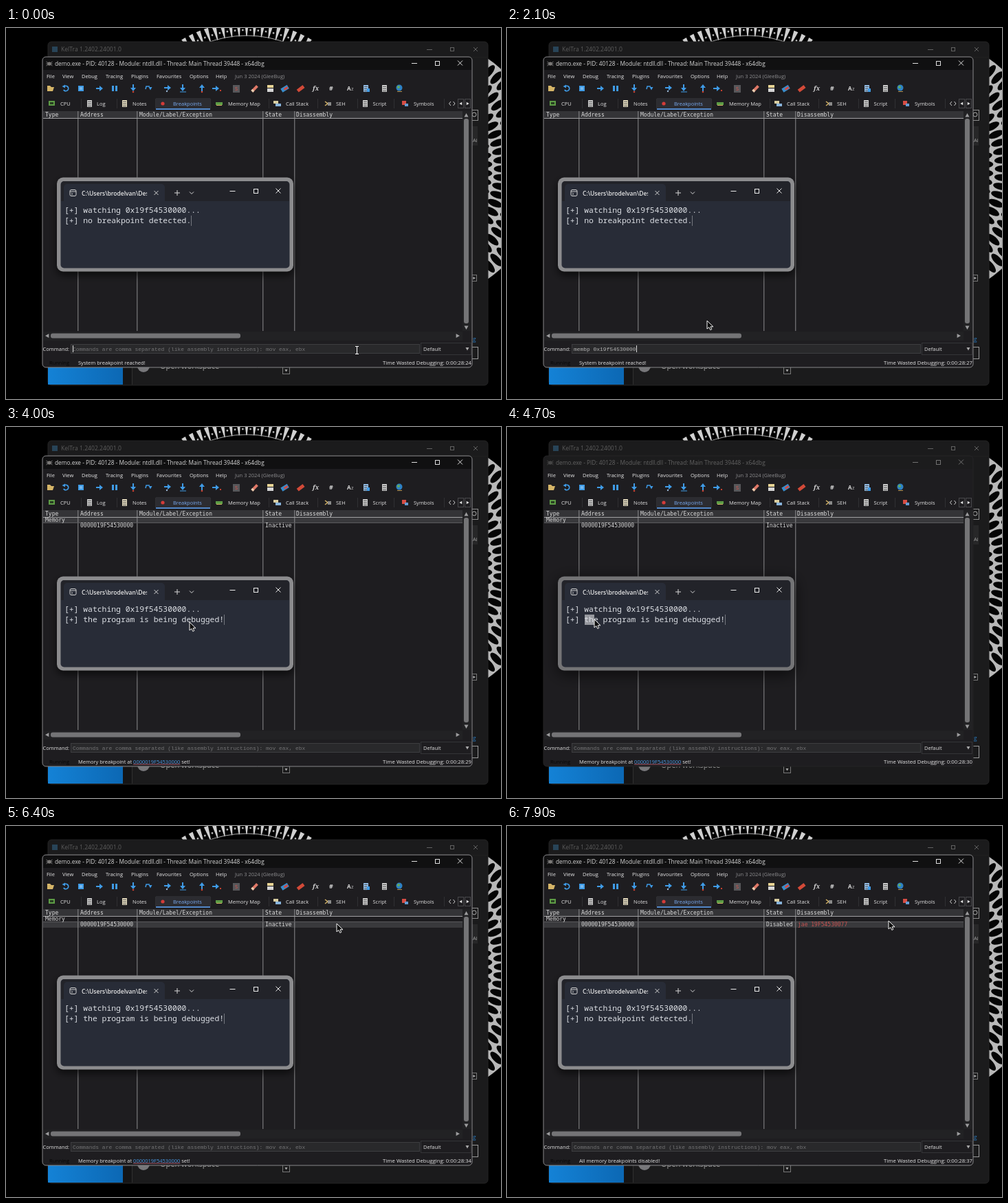
Animation of 720x540 px, one loop 8000 ms. Source, as an HTML page with a canvas:

```html
<!DOCTYPE html>
<html>
<head>
<meta charset="utf-8">
<title>Breakpoint demo</title>
<style>
html, body { margin: 0; width: 100%; height: 100%; overflow: hidden; background: #000; }
canvas { display: block; width: 720px; height: 540px; }
</style>
</head>
<body>
<canvas id="stage" width="720" height="540"></canvas>
<script>
const g = document.getElementById('stage').getContext('2d');
const LOOP = 8000, STEP = 100, TAU = Math.PI * 2;
const UI = '7.5px "Open Sans", sans-serif';
const UI_BIG = '8.3px "Open Sans", sans-serif';
const TABLE = '8px "DejaVu Sans Mono", monospace';
const INPUT = '7.95px "Liberation Mono", monospace';
const TERM = '11.38px "Noto Sans Mono", monospace';
const BLUE = '#3f9be6', RED = '#c8402f', GREEN = '#5d9c45', SAND = '#d5b568';

// ---------- drawing helpers ----------
function rect(x, y, w, h, color) { g.fillStyle = color; g.fillRect(x, y, w, h); }
function box(x, y, w, h, color) {
  g.strokeStyle = color; g.lineWidth = 1; g.strokeRect(x + .5, y + .5, w - 1, h - 1);
}
function round(x, y, w, h, r, fill, stroke) {
  g.beginPath(); g.roundRect(x, y, w, h, r);
  if (fill) { g.fillStyle = fill; g.fill(); }
  if (stroke) { g.strokeStyle = stroke; g.lineWidth = 1; g.stroke(); }
}
function path(points, color, width = 1) {
  g.beginPath();
  points.forEach(([x, y]) => g.lineTo(x, y));
  g.strokeStyle = color; g.lineWidth = width; g.stroke();
}
function poly(points, color) {
  g.beginPath();
  points.forEach(([x, y]) => g.lineTo(x, y));
  g.fillStyle = color; g.fill();
}
function disc(x, y, r, color) {
  g.beginPath(); g.arc(x, y, r, 0, TAU); g.fillStyle = color; g.fill();
}
function text(str, x, y, font, color, align = 'left') {
  g.font = font; g.fillStyle = color; g.textAlign = align;
  g.fillText(str, x, y);
  return x + g.measureText(str).width;
}
function at(x, y, angle, draw) {
  g.save(); g.translate(x, y); g.rotate(angle); draw(); g.restore();
}
function triangle(x, y, angle, color, s = 3) {
  at(x, y, angle, () => poly([[-s * .8, -s], [s, 0], [-s * .8, s]], color));
}
function windowButtons(xs, y, color, s = 3.5) {
  const [min, max, close] = xs;
  path([[min - 4, y + .5], [min + 4, y + .5]], color);
  box(Math.round(max - s), Math.round(y - s), s * 2, s * 2, color);
  cross(close, y, s, color);
}
function cross(x, y, s, color) {
  path([[x - s, y - s], [x + s, y + s]], color);
  path([[x + s, y - s], [x - s, y + s]], color);
}

// ---------- wallpaper ----------
function wallpaper() {
  rect(0, 0, 720, 540, '#000');
  for (let i = 0; i < 96; i++) {
    at(350, 175, i * TAU / 96, () => {
      poly([[163, -.6], [184, -3.2], [184, 3.2], [163, .6]], '#cfcfcf');
      disc(172, 5.6, 1.4, '#b5b5b5');
    });
  }
  g.beginPath(); g.arc(350, 175, 164, 0, TAU);
  g.strokeStyle = '#aaa'; g.lineWidth = 1; g.stroke();

  g.save();
  g.beginPath(); g.rect(698, 30, 22, 350); g.clip();
  disc(590, 205, 195, '#b8b8b8');
  for (let ring = 0; ring < 5; ring++) {
    const r = 181 - ring * 25, n = 84 - ring * 10;
    for (let i = 0; i < n; i++) {
      at(590, 205, (i + ring % 2 / 2) * TAU / n, () => {
        g.beginPath(); g.ellipse(r, 0, 11.5, 5, 0, 0, TAU);
        g.fillStyle = '#050505'; g.fill();
      });
    }
  }
  g.restore();
}

// ---------- window behind ----------
function backWindow() {
  round(61, 20, 640, 500, 5, '#1b1b1c', '#242424');
  rect(61, 42, 640, 1, '#202020');
  rect(67, 27, 8, 8, '#284458');
  text('KelTra 1.2402.24001.0', 80, 34, '8.6px "Open Sans", sans-serif', '#5c5c5c');
  windowButtons([616, 649, 683], 31, '#626262', 3);
  const blue = g.createLinearGradient(61, 0, 170, 0);
  blue.addColorStop(0, '#1482d6'); blue.addColorStop(1, '#0c68b4');
  rect(61, 488, 109, 31, blue);
  rect(170, 488, 13, 31, '#151516');
  rect(183, 488, 1, 31, '#303030');
  disc(200, 492, 9, '#77777a');
  text('Open workspace', 224, 496, '11px "Open Sans", sans-serif', '#a5a5a5');
  box(402, 493, 11, 11, '#777');
  triangle(407.5, 498.5, Math.PI / 2, '#aaa', 2);
  box(672, 119, 15, 16, '#8d8d8d');
  g.beginPath(); g.arc(681, 126, 3, 0, TAU); g.strokeStyle = '#aaa'; g.stroke();
  rect(678, 143, 8, 28, '#272728');
  text('Ai', 679, 166, UI, '#a0a0a0');
  box(674, 359, 11, 10, '#777');
  triangle(681, 364, 0, '#aaa', 2);
  text('g', 679, 456, UI_BIG, '#2a79bd');
  box(670, 464, 17, 18, '#999');
}

// ---------- toolbar ----------
function arrow(x, y, angle, color = BLUE) {
  at(x, y, angle, () => {
    rect(-5, -1, 6, 2, color);
    poly([[0, -4], [5, 0], [0, 4]], color);
  });
}
function page(x, y, color = '#c9c9c9') {
  rect(x - 3, y - 5, 7, 10, color);
  for (let i = 0; i < 3; i++) rect(x - 2, y - 3 + i * 3, 5, 1, '#555');
}
function toolbar(y) {
  const down = Math.PI / 2;
  poly([[60, y - 4], [64, y - 4], [66, y - 2], [70, y - 2], [68, y + 4], [60, y + 4]], SAND);
  g.beginPath(); g.arc(87, y, 3.7, -2.4, 2.6); g.strokeStyle = BLUE; g.lineWidth = 1.8; g.stroke();
  triangle(84, y - 3, Math.PI, BLUE, 2.5);
  rect(105, y - 4, 8, 8, BLUE); rect(107, y - 2, 4, 4, '#78b9ee');
  arrow(136, y, 0);
  rect(154, y - 4, 3, 8, BLUE); rect(159, y - 4, 3, 8, BLUE);
  arrow(185, y - 1, down); disc(185, y + 5, 1.3, RED);
  path([[203, y + 1], [204, y - 3], [209, y - 3]], BLUE, 1.5); triangle(210, y, down, BLUE, 2.5);
  arrow(235, y - 1, 0); disc(234, y + 4, 1.2, '#9cb8d4');
  arrow(257, y - 1, down); path([[253, y + 5], [262, y + 5]], BLUE);
  arrow(285, y - 1, -down); disc(285, y + 5, 1.3, RED);
  arrow(305, y, 0); rect(311, y + 2, 2, 2, RED);
  rect(330, y - 5, 10, 11, '#57575a'); text('S', 333, y + 3, UI, '#e0524a');
  at(362, y, -.8, () => { rect(-6, -2, 11, 4, '#df7867'); rect(-6, -2, 3, 4, '#e8d1b4'); });
  rect(380, y - 5, 9, 4, '#e9d494'); rect(380, y, 9, 5, '#d6d6d6');
  at(406, y, -.55, () => { rect(-6, -3, 11, 6, '#398dcb'); rect(-2, -1, 6, 3, '#d54b42'); });
  at(429, y, -.65, () => { rect(-6, -2.5, 11, 5, '#d34a38'); });
  text('fx', 446, y + 3, 'italic bold 9px "Noto Serif", serif', '#d9d9d9');
  text('#', 470, y + 3, 'bold 9px "Open Sans", sans-serif', '#d6d6d6');
  text('A', 496, y + 3, 'bold 8px "Open Sans", sans-serif', '#ddd');
  text('z', 502, y + 3, UI, '#bbb');
  page(523, y, '#91bae2'); rect(525, y, 4, 5, BLUE);
  page(550, y);
  disc(572, y - 1, 4.5, '#2d82c5'); disc(571, y - 2, 2, '#65a95a'); rect(569, y + 4, 7, 1, '#b09050');
}

// ---------- tabs ----------
function tabs(y) {
  rect(218, 102, 79, 17, '#2c2c31');
  rect(218, 117, 79, 2, '#5387c8');
  for (const x of [109, 161, 217, 297, 382, 453, 511, 564, 637]) rect(x, 103, 1, 14, '#303033');
  const labels = [['CPU', 79], ['Log', 132], ['Notes', 184], ['Breakpoints', 243], ['Memory Map', 323],
    ['Call Stack', 407], ['SEH', 480], ['Script', 533.5], ['Symbols', 593]];
  for (const [label, x] of labels)
    text(label, x, y + 3, UI, label === 'Breakpoints' ? '#78aaf0' : '#e2e2e2');
  rect(62, y - 4, 9, 7, GREEN); rect(64, y - 2, 5, 3, '#283d22');
  page(121, y); page(172, y, '#e0d7ba');
  disc(228, y, 2.6, '#d53c39');
  rect(305, y - 2, 10, 4, GREEN); rect(306, y + 2, 8, 1, SAND);
  rect(389, y - 4, 7, 4, '#d9cda0'); rect(392, y, 8, 4, '#88b3da');
  path([[464, y - 3], [468, y], [464, y + 3]], SAND, 1.5); rect(468, y - 2, 5, 5, '#8b8b8b');
  page(522, y);
  rect(576, y - 4, 6, 6, '#d74d45'); rect(580, y, 5, 4, '#629cd2');
  path([[647, y - 3], [644.5, y], [647, y + 3]], '#ccc');
  path([[650.5, y - 3], [653, y], [650.5, y + 3]], '#ccc');
  for (const [x, a] of [[661.5, Math.PI], [671.5, 0]]) {
    box(x - 4.5, 103, 9, 14, '#48484b'); triangle(x, y, a, '#ddd', 2.2);
  }
}

// ---------- debugger window ----------
function debuggerWindow(s) {
  const bg = '#1e1d20';
  round(53, 42, 625, 452, 5, bg, s.termActive ? '#242425' : '#88888a');
  round(54, 43, 623, 18, [4, 4, 0, 0], s.termActive ? '#1c1c1d' : '#101011');
  const ink = s.termActive ? '#626262' : '#d6d6d6';
  disc(63, 52, 2.6, s.termActive ? '#484848' : '#85807c');
  for (const dy of [-3, 0, 3]) path([[58.5, 52 + dy], [67.5, 52 - dy]], s.termActive ? '#444' : '#777');
  text('demo.exe - PID: 40128 - Module: ntdll.dll - Thread: Main Thread 39448 - x64dbg', 71, 55, UI_BIG, ink);
  windowButtons([594, 627, 660.5], 51, s.termActive ? '#717171' : '#e0e0e0');

  const menu = [['File', 59], ['View', 82], ['Debug', 110], ['Tracing', 145], ['Plugins', 182],
    ['Favourites', 219], ['Options', 267], ['Help', 305]];
  for (const [label, x] of menu) text(label, x, 72.5, UI, '#e8e8e8');
  text('Jun 3 2024 (GleeBug)', 333, 72.5, UI, '#8d8d8f');
  toolbar(88);
  tabs(110);

  rect(54, 121, 610, 10, '#343437');
  if (s.row) rect(54, s.row === 1 ? 132 : 139, 610, s.row === 1 ? 7 : 9, '#39393c');
  for (const x of [104, 190, 373, 419]) rect(x + .3, 121, 1, 320, '#8c8c8e');
  rect(54, 131, 610, 1, '#a0a0a2');
  const heads = [['Type', 57], ['Address', 108], ['Module/Label/Exception', 194], ['State', 377], ['Disassembly', 422]];
  for (const [label, x] of heads) text(label, x, 129, TABLE, '#dcdcdc');
  if (s.row) {
    rect(54, 139, 610, 1, '#5a5a5d');
    text('Memory', 57, 138, TABLE, '#d8d8d8');
    text('0000019F54530000', 108, 146, TABLE, '#d8d8d8');
    text(s.disabled ? 'Disabled' : 'Inactive', 377, 146, TABLE, '#d8d8d8');
    if (s.disabled) text('jae 19F54530077', 423, 146, TABLE, '#c75452');
  }

  rect(664, 121, 13, 320, '#222224');
  round(666, 132, 7, 298, 3, '#747476');
  triangle(669.5, 127, -Math.PI / 2, '#9c9c9e');
  triangle(669.5, 436, Math.PI / 2, '#9c9c9e');
  rect(54, 442, 610, 13, '#222224');
  round(65, 444.5, 276, 7, 3, '#747476');
  triangle(60, 448, Math.PI, '#9c9c9e');
  triangle(657, 448, 0, '#9c9c9e');

  text('Command:', 53.5, 470, UI, '#e2e2e2');
  rect(94, 460, 508, 14, '#29292b');
  box(94, 460, 508, 14, '#3d3d40');
  const end = s.typed ? text(s.typed, 97, 470, INPUT, '#b4b4b4')
    : (text('Commands are comma separated (like assembly instructions): mov eax, ebx', 97, 470, INPUT, '#737375'), 97);
  if (s.caret) rect(Math.round(end), 462, 1, 10, '#ddd');
  box(603, 458, 74, 18, '#343437');
  text('Default', 607, 470, UI, '#e2e2e2');
  triangle(671, 467, Math.PI / 2, '#aaa', 2.5);

  text('Running', 63, 489.5, UI, '#050505');
  let x = 105;
  if (s.status === 'set') {
    x = text('Memory breakpoint at ', x, 489.5, UI, '#e4e4e4');
    const linkEnd = text('0000019F54530000', x, 489.5, UI, '#4c9ce8');
    rect(x, 490.5, linkEnd - x, 1, '#a85868');
    text(' set!', linkEnd, 489.5, UI, '#e4e4e4');
  } else text(s.status, x, 489.5, UI, '#e4e4e4');
  text('Time Wasted Debugging: 0:00:28:' + s.seconds, 677, 489.5, '7.75px "Open Sans", sans-serif', '#e4e4e4', 'right');

  if (s.options.length) {
    const h = s.options.length * 9.5 + 2;
    rect(94, 474, 508, h, '#29292b');
    box(94, 474, 508, Math.round(h), '#39393c');
    s.options.forEach((item, i) => text(item, 97, 480 + i * 9.5, INPUT, '#a7a7a9'));
  }
}

// ---------- terminal ----------
function terminal(s) {
  g.save();
  g.shadowColor = 'rgba(0,0,0,.65)'; g.shadowBlur = s.termActive ? 22 : 12; g.shadowOffsetY = 5;
  round(74, 217.5, 344, 137, 9, s.termActive ? '#747476' : '#8c8c8e');
  g.restore();
  round(79.5, 223, 333, 126.5, 5, '#282c37');
  round(80, 223, 332, 29, [5, 5, 0, 0], '#222329');
  round(84, 227, 147, 25, [5, 5, 0, 0], '#282c37');
  round(93, 235.5, 9, 9, 2, null, '#d0d0d0');
  path([[93, 238], [102, 238]], '#d0d0d0');
  path([[95, 240], [97, 241.5], [95, 243]], '#d0d0d0', .8);
  g.save();
  g.beginPath(); g.rect(108, 230, 97, 20); g.clip();
  text('C:\\Users\\brodelvan\\Desktop', 110, 243.5, '600 8.5px "Open Sans", sans-serif', '#e8e8e8');
  g.restore();
  cross(218.5, 240, 3, '#d4d4d4');
  path([[245, 240], [253, 240]], '#d8d8d8'); path([[249, 236], [249, 244]], '#d8d8d8');
  path([[267, 238.5], [270, 241.5], [273, 238.5]], '#d8d8d8');
  const [cx, cy] = s.cursor;
  if (cx > 379 && cx < 413 && cy > 222 && cy < 253) round(379.5, 223, 32.5, 28, [0, 5, 0, 0], '#c52b25');
  windowButtons([329.5, 363, 396], 237, '#ececec');

  if (s.selectTo > 113) rect(113, 273, s.selectTo - 113, 15, '#96989e');
  text('[+] watching 0x19f54530000...', 85, 269, TERM, '#dcdfe4');
  const end = text(s.detected ? '[+] the program is being debugged!' : '[+] no breakpoint detected.',
    85, 284, TERM, '#dcdfe4');
  rect(Math.round(end), 273, 1, 15, '#74777e');
}

function pointer([x, y], beam) {
  if (beam) {
    rect(x, 464, 1, 10, '#fff'); rect(x - 2, 463, 5, 1, '#fff'); rect(x - 2, 474, 5, 1, '#fff');
    return;
  }
  g.save(); g.translate(x, y);
  const shape = [[0, 0], [0, 12], [2.8, 9.5], [4.8, 13.5], [6.8, 12.5], [5, 8.8], [9, 8.8], [0, 0]];
  poly(shape, '#0c0c0c'); path(shape, '#f4f4f4');
  g.restore();
}

// ---------- timeline ----------
const track = [[0, 510, 469], [1500, 510, 469], [2000, 291, 426], [2900, 291, 426], [3700, 267, 284],
  [4100, 267, 284], [4500, 113, 280], [4600, 113, 280], [5200, 304, 280], [5500, 382, 252],
  [5900, 476, 140], [6300, 481, 142], [7100, 481, 142], [7800, 555, 138], [8000, 555, 138]];
const typing = [[0, ''], [200, 'm'], [300, 'me'], [400, 'mem'], [500, 'memb'], [800, 'membp'],
  [1000, 'membp '], [1500, 'membp 0x19f54530000'], [2800, '']];
const ticks = [500, 1200, 1900, 2700, 3500, 4250, 4750, 5250, 5800, 6300, 6800, 7300, 7800];
const matches = ['membp', 'membpc', 'membpe', 'membpd'];

function cursorAt(t) {
  const i = Math.max(1, track.findIndex(k => k[0] >= t));
  const [t0, x0, y0] = track[i - 1], [t1, x1, y1] = track[i];
  const p = (t - t0) / (t1 - t0), e = p * p * (3 - 2 * p);
  return [Math.round(x0 + (x1 - x0) * e), Math.round(y0 + (y1 - y0) * e)];
}
function stateAt(t) {
  const typed = typing.filter(k => k[0] <= t).pop()[1];
  const cursor = cursorAt(t);
  const disabled = t >= 7200;
  return {
    cursor, typed, disabled,
    beam: t < 200,
    caret: t < 2800,
    options: t < 200 || t >= 1000 ? [] : t < 500 ? [...matches, 'memcpy', 'meminfo'] : matches,
    row: t < 2800 ? 0 : t < 6000 ? 1 : 2,
    status: disabled ? 'All memory breakpoints disabled!' : t < 2800 ? 'System breakpoint reached!' : 'set',
    detected: t >= 3000 && t < 7300,
    termActive: t >= 4500 && t < 6000,
    selectTo: t < 4600 || t >= 5800 ? 0 : t < 5200 ? cursor[0] : 304,
    seconds: 24 + ticks.filter(k => k <= t).length
  };
}
function frame(now) {
  const s = stateAt(Math.floor(now % LOOP / STEP) * STEP);
  wallpaper();
  backWindow();
  debuggerWindow(s);
  terminal(s);
  pointer(s.cursor, s.beam);
  requestAnimationFrame(frame);
}
requestAnimationFrame(frame);
</script>
</body>
</html>
```
